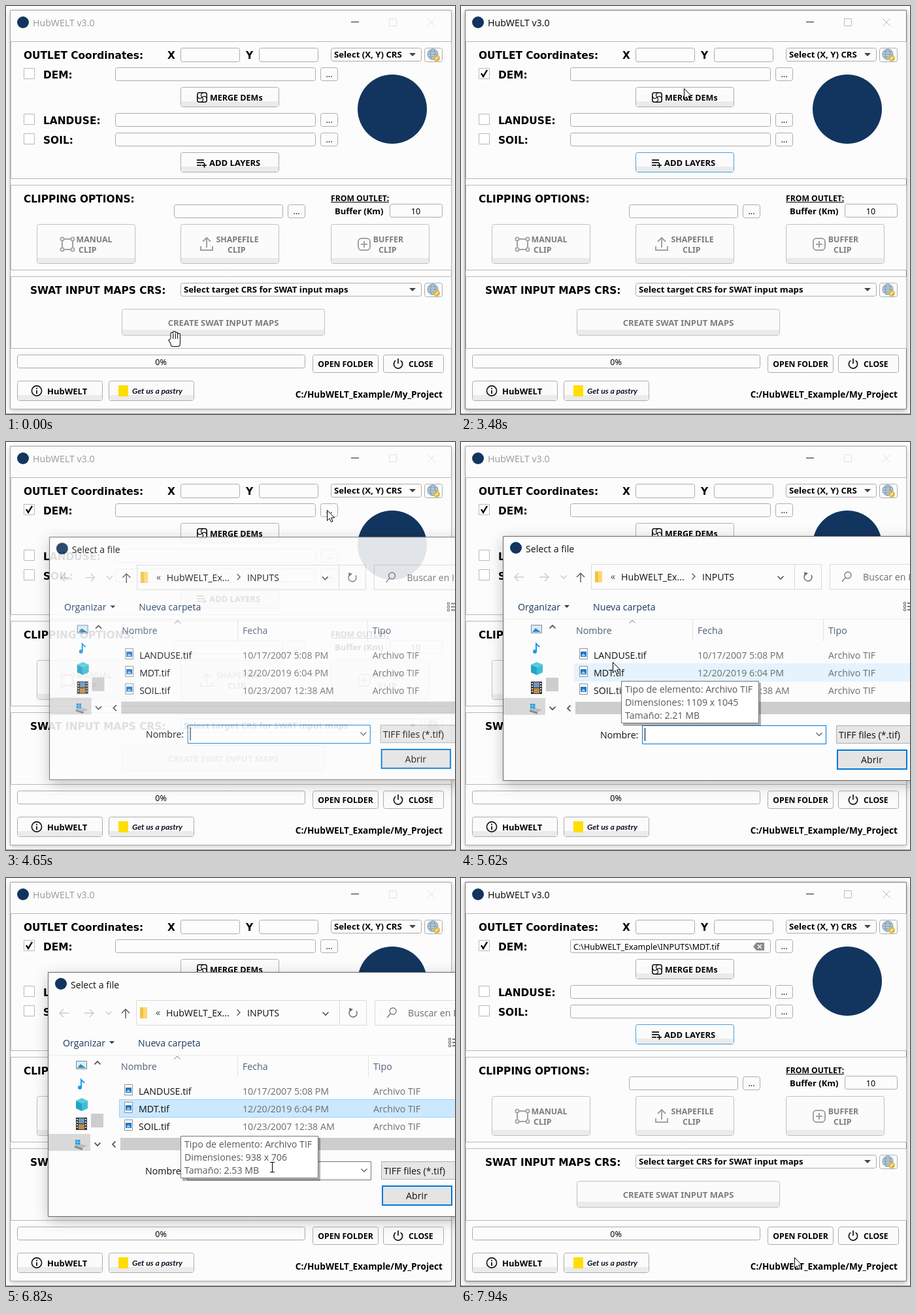
An HTML page with a canvas for the animation above (8 s loop, 687 px wide and 625 px high).

```html
<!DOCTYPE html>
<html lang="en">
<head>
<meta charset="utf-8">
<title>HubWELT v3.0</title>
<style>
html, body { margin: 0; width: 100%; height: 100%; overflow: hidden; background: #fff; }
canvas { display: block; }
</style>
</head>
<body>
<canvas id="stage" width="687" height="625"></canvas>
<script>
const c = document.getElementById('stage').getContext('2d');
const LOOP = 8000, TICK = 125, APP = 'HubWELT';
const HEAD = 'bold {}px "DejaVu Sans", sans-serif';
const BOLD = 'bold {}px "Noto Sans", sans-serif';
const PLAIN = '{}px "Noto Sans", sans-serif';
const UI = '{}px "Open Sans", sans-serif';
const LOGO = '#12355f', INK = '#111', GRAY = '#6d6d6d', NAV = '#1e395b', HEADER = '#4c607a';

// When things happen, in ms
const CHECKED = 2850, BROWSE = 3880, OPEN = 4520, PICK = 5980, ACCEPT = 7410, CLOSE = 7550, DONE = 7680;

// Pointer stops: time, x, y
const STOPS = [
  [0, 258, 510], [1240, 258, 510], [1760, 133, 161], [2030, 45, 116], [2600, 38, 107],
  [CHECKED, 38, 107], [3480, 341, 126], [BROWSE, 491, 104], [4800, 491, 104],
  [5190, 290, 306], [5620, 232, 337], [PICK, 221, 356], [6690, 221, 356],
  [6820, 407, 443], [6990, 549, 495], [ACCEPT, 578, 482], [DONE, 578, 482], [LOOP - 60, 510, 581]
];
const FILES = [
  { name: 'LANDUSE.tif', date: '10/17/2007 5:08 PM', dim: '1109 x 1045', size: '2.21 MB' },
  { name: 'MDT.tif', date: '12/20/2019 6:04 PM', dim: '938 x 706', size: '2.53 MB' },
  { name: 'SOIL.tif', date: '10/23/2007 12:38 AM' }
];

// Rises from 0 to 1 in n equal jumps, the first at time t0
const stairs = (t, t0, n) => Math.min(1, Math.max(0, Math.floor((t - t0) / 130 + 1) / n));
const between = (t, from, to) => t >= from && t < to;

// Straight moves between stops, shown in jumps of about one tick
function pointerAt(t) {
  const i = STOPS.findLastIndex(s => s[0] <= t);
  const [t0, x0, y0] = STOPS[i], [t1, x1, y1] = STOPS[i + 1] || [LOOP, x0, y0];
  const n = Math.max(1, Math.round((t1 - t0) / TICK));
  const k = Math.floor((t - t0) / (t1 - t0) * n) / n;
  return [x0 + (x1 - x0) * k, y0 + (y1 - y0) * k];
}

function text(s, x, y, size, color = '#000', font = BOLD, align = 'left') {
  c.font = font.replace('{}', size);
  c.fillStyle = color;
  c.textAlign = align;
  c.fillText(s, x, y);
}
const ui = (s, x, y, color = INK, align) => text(s, x, y, 14.2, color, UI, align);
const head = (s, x, y) => text(s, x, y, 15.4, '#000', HEAD);
function fill(x, y, w, h, color) {
  c.fillStyle = color;
  c.fillRect(x, y, w, h);
}
function box(x, y, w, h, bg, edge, r = 0, lw = 1) {
  c.beginPath();
  c.roundRect(x + lw / 2, y + lw / 2, w - lw, h - lw, r);
  if (bg) { c.fillStyle = bg; c.fill(); }
  if (edge) { c.strokeStyle = edge; c.lineWidth = lw; c.stroke(); }
}
function trace(p) {
  c.beginPath();
  for (let i = 0; i < p.length; i += 2) c.lineTo(p[i], p[i + 1]);
}
function line(color, lw, ...p) {
  trace(p);
  c.strokeStyle = color;
  c.lineWidth = lw;
  c.stroke();
}
function shape(color, ...p) {
  trace(p);
  c.fillStyle = color;
  c.fill();
}
function disc(x, y, r, color) {
  c.beginPath();
  c.arc(x, y, r, 0, 7);
  c.fillStyle = color;
  c.fill();
}
function ring(x, y, r, color, lw, from = 0, to = 2 * Math.PI) {
  c.beginPath();
  c.arc(x, y, r, from, to);
  c.strokeStyle = color;
  c.lineWidth = lw;
  c.stroke();
}
// Draws at (x, y), turned by a quarter circle q times
function turned(x, y, q, paint) {
  c.save();
  c.translate(x, y);
  c.rotate(q * Math.PI / 2);
  paint();
  c.restore();
}
// Directions: 0 up, 1 right, 2 down, 3 left
const chevron = (x, y, q, color, lw = 1.4) =>
  turned(x, y, q, () => line(color, lw, -4.5, 2.5, 0, -2, 4.5, 2.5));
const arrow = (x, y, q, color) => turned(x, y, q, () => {
  line(color, 1.4, 0, 7, 0, -7);
  line(color, 1.4, -6, -1, 0, -7, 6, -1);
});
function cross(x, y, r, color, lw) {
  line(color, lw, x - r, y - r, x + r, y + r);
  line(color, lw, x + r, y - r, x - r, y + r);
}
function plus(x, y, r, color, lw) {
  line(color, lw, x - r, y, x + r, y);
  line(color, lw, x, y - r, x, y + r);
}
function shadowed(color, blur, dy, paint) {
  c.save();
  c.shadowColor = color;
  c.shadowBlur = blur;
  c.shadowOffsetY = dy;
  paint();
  c.restore();
}

function button(x, y, w, h, edge = '#adadad') {
  box(x, y, w, h, '#fbfbfb', edge, 3);
  if (h > 30) fill(x + 1, y + h - 9, w - 2, 8, '#ebebeb');
}
const field = (x, y, w, h = 21) => box(x, y, w, h, '#fcfcfc', '#ababab', 3);
const value = (s, x, y, align) => text(s, x, y, 12.5, '#000', PLAIN, align);
function dots(x, y) {
  button(x, y, 27, 21);
  value('...', x + 13.5, y + 15, 'center');
}
function combo(x, y, w, label) {
  field(x, y, w);
  c.save();
  c.beginPath();
  c.rect(x, y, w - 25, 21);
  c.clip();
  text(label, x + 5, y + 15, 13.2);
  c.restore();
  shape('#444', x + w - 19, y + 8, x + w - 9, y + 8, x + w - 14, y + 13);
}
function globe(x, y) {
  button(x - 14, y - 11, 28, 22);
  disc(x - 1, y - 1, 8, '#b9cddd');
  ring(x - 1, y - 1, 8, '#7b97ae', 1);
  c.beginPath();
  c.ellipse(x - 1, y - 1, 3.5, 8, 0, 0, 7);
  c.stroke();
  for (const d of [-4, 0, 4]) line('#7b97ae', 1, x - 8, y - 1 + d, x + 6, y - 1 + d);
  disc(x + 5, y + 5, 5, '#dcb945');
  line('#fff', 1.5, x + 3, y + 7, x + 7, y + 3);
}
function check(x, y, on) {
  box(x, y, 17, 17, '#fff', '#b9b9b9');
  if (on) line('#000', 2.4, x + 4, y + 8, x + 7, y + 13, x + 13, y + 3);
}

function icons() {
  const g = '#a2a2a2';
  box(292, 132, 16, 16, null, INK, 3, 1.6);
  for (let q = 0; q < 4; q++) turned(300, 140, q, () => ring(2, -3.5, 3.5, INK, 1.3, 1.9, 4.6));
  for (let i = 0; i < 3; i++) line(INK, 1.8, 292, 236 + 4 * i, i < 2 ? 303 : 299, 236 + 4 * i);
  plus(303.5, 244, 3.5, INK, 1.8);

  box(85, 356, 18, 18, null, g, 0, 2);
  for (const x of [86, 102]) for (const y of [357, 373]) {
    disc(x, y, 3.2, '#fbfbfb');
    ring(x, y, 2.6, g, 1.8);
  }
  line(g, 2, 307, 370, 307, 356);
  line(g, 2, 301, 361, 307, 355, 313, 361);
  line(g, 2, 298, 368, 298, 374, 316, 374, 316, 368);
  box(538, 355, 20, 20, null, g, 5, 2);
  plus(548, 365, 5, g, 2);

  ring(600, 548.5, 6.6, INK, 1.7, -.95, Math.PI + .95);
  line(INK, 1.7, 600, 540, 600, 548);
  ring(47, 589.5, 7.6, INK, 1.6);
  line(INK, 1.8, 47, 588.5, 47, 594);
  disc(47, 585.8, 1.1, INK);
}

function mainWindow(t) {
  const active = between(t, CHECKED, BROWSE) || t >= DONE;
  shadowed(active ? 'rgba(0,0,0,.35)' : 'rgba(0,0,0,.22)', 8, 2, () => fill(6, 6, 676, 612, '#fcfcfc'));
  box(6, 6, 676, 612, '#fcfcfc', active ? '#777' : '#a5a5a5');
  fill(0, 624, 687, 1, '#9a9a9a');

  disc(26, 25, 9, LOGO);
  ui(APP + ' v3.0', 41, 31, active ? '#000' : '#999');
  fill(528, 24, 12, 1, '#222');
  const faint = active ? '#bbb' : '#e2e2e2';
  box(586, 19, 12, 12, null, faint);
  cross(651, 25, 6, faint, 1);

  for (const [y, h] of [[54, 211], [274, 131], [414, 111]]) box(7, y, 675, h, null, '#b8b8b8');

  head('OUTLET Coordinates:', 27, 81);
  ['X', 'Y'].forEach((s, i) => {
    head(s, 247 + 120 * i, 81);
    field(267 + 120 * i, 64, 91, 22);
  });
  combo(497, 64, 139, 'Select (X, Y) CRS');
  globe(654, 75);
  ['DEM:', 'LANDUSE:', 'SOIL:'].forEach((s, i) => {
    const y = i ? 134 + 30 * i : 94;
    check(27, y + 1, !i && t >= CHECKED);
    head(s, 57, y + 17);
    field(167, y, 307);
    dots(481, y);
  });
  if (t >= DONE) {
    value(`C:\\${APP}_Example\\INPUTS\\MDT.tif`, 172, 110);
    shape('#888', 447, 105, 452, 99, 464, 99, 464, 111, 452, 111);
    cross(457, 105, 3, '#fff', 1.5);
  }
  button(267, 124, 151, 31);
  text('MERGE DEMs', 312, 145, 12.5);
  button(267, 224, 151, 31, active ? '#4aa0e0' : undefined);
  text('ADD LAYERS', 311, 245, 13);
  disc(591, 158, 53, LOGO);

  head('CLIPPING OPTIONS:', 27, 301);
  field(257, 304, 167);
  dots(431, 304);
  text('FROM OUTLET:', 497, 299, 12.2);
  fill(497, 300, 89, 1, '#000');
  text('Buffer (Km)', 503, 319, 13);
  field(587, 303, 81);
  value('10', 627, 319, 'center');
  [['MANUAL', 135], ['SHAPEFILE', 354], ['BUFFER', 585]].forEach(([s, x], i) => {
    button([47, 267, 497][i], 334, 151, 61, '#c0c0c0');
    text(s, x, 362, 12.4, '#7d7d7d', BOLD, 'center');
    text('CLIP', x - (i ? 15 : 24), 378, 12.4, '#7d7d7d');
  });

  head('SWAT INPUT MAPS CRS:', 37, 441);
  combo(267, 424, 369, 'Select target CRS for SWAT input maps');
  globe(654, 435);
  button(177, 464, 311, 41, '#c0c0c0');
  text('CREATE SWAT INPUT MAPS', 332.5, 490, 13, '#7d7d7d', BOLD, 'center');

  field(17, 534, 441);
  value('0%', 237, 550, 'center');
  button(469, 534, 101, 28);
  text('OPEN FOLDER', 519.5, 553, 12.2, '#000', BOLD, 'center');
  button(577, 534, 93, 28);
  text('CLOSE', 616, 553, 12.2);
  button(17, 574, 131, 31);
  text(APP, 63, 595, 13);
  button(157, 574, 131, 31);
  fill(172, 581, 15, 17, '#ffdd00');
  text('Get us a pastry', 193, 594, 12.2, '#0d0c22', 'italic bold {}px Lato, sans-serif');
  text(`C:/${APP}_Example/My_Project`, 668, 600, 13.6, '#000', BOLD, 'right');
  icons();
}

function fileIcon(x, y) {
  box(x, y, 13, 17, '#fff', '#8a8f96');
  fill(x + 2, y + 5, 9, 8, '#1f78c8');
  shape('#9bd0f5', x + 3, y + 12, x + 6, y + 8, x + 10, y + 12);
}

function sidebar() {
  box(107, 280, 17, 13, '#d7ecfa', '#7d8a96');
  shape('#3b87b9', 109, 291, 114, 285, 122, 291);
  line('#1e9be8', 2, 115, 321, 115, 309, 120, 314);
  disc(113, 321, 3, '#1e9be8');
  shape('#22a5c4', 107, 341, 116, 345, 116, 357, 107, 353);
  shape('#3fbdd6', 125, 341, 116, 345, 116, 357, 125, 353);
  shape('#58cbe0', 107, 341, 116, 337, 125, 341, 116, 345);
  fill(107, 367, 17, 19, '#333');
  fill(111, 368, 9, 8, '#6f97bd');
  fill(111, 377, 9, 8, '#b98c4d');
  for (let y = 369; y < 385; y += 4) for (const x of [108, 121]) fill(x, y, 2, 2, '#ddd');
  fill(65, 392, 64, 26, '#d9d9d9');
  shape('#b8bcc0', 105, 410, 111, 407, 124, 410, 117, 414);
  shape('#85898d', 105, 410, 117, 414, 117, 417, 105, 413);
  for (const x of [106, 110]) for (const y of [401, 405]) fill(x, y, 3.4, 3.4, '#1e9be8');
  chevron(140, 283, 0, '#444', 1.6);
  chevron(140, 408, 2, '#444', 1.6);
  fill(130, 361, 19, 21, '#cdcdcd');
}

function addressBar() {
  arrow(89, 207, 3, '#c9c9c9');
  arrow(127, 207, 1, '#c9c9c9');
  chevron(157, 207, 2, '#c9c9c9');
  arrow(183, 208, 0, '#555');
  for (const [x, w] of [[199, 312], [510, 42], [564, 160]]) box(x, 187, w, 39, '#fcfcfc', '#d9d9d9');
  fill(205, 198, 11, 17, '#ffd76e');
  fill(205, 198, 5, 17, '#f3c14b');
  ui('«', 229, 211, '#444');
  ui(APP + '_Ex...', 245, 212);
  chevron(356, 206, 1, '#555');
  ui('INPUTS', 369, 212);
  chevron(489, 208, 2, '#555', 1.6);
  ring(531, 207, 6, '#666', 1.4, -.6, 4.3);
  shape('#666', 525, 199, 531, 201, 526, 205);
  ring(592, 204, 5, '#777', 1.3);
  line('#777', 1.3, 588, 208, 583, 214);
  ui('Buscar en INPUTS', 615, 212, GRAY);
}

function fileList(t) {
  const columns = [176, 362, 562];
  ['Nombre', 'Fecha', 'Tipo'].forEach((s, i) => {
    ui(s, columns[i], 294, HEADER);
    if (i) fill(columns[i] - 8, 272, 1, 33, '#e2e2e2');
  });
  chevron(262, 275, 0, '#777', 1);

  if (between(t, 5340, 5620)) fill(173, 312, 530, 27, '#e5f3ff');
  if (t >= 5620) fill(173, 339, 530, 28, t >= ACCEPT ? '#d9d9d9' : t >= PICK ? '#cce8ff' : '#e5f3ff');
  if (between(t, PICK, ACCEPT)) box(173, 339, 530, 28, null, '#99d1ff');
  FILES.forEach((f, i) => {
    const y = 332 + 27 * i;
    fileIcon(181, y - 16);
    ui(f.name, 203, y);
    ui(f.date, 362, y, GRAY);
    ui('Archivo TIF', 562, y, GRAY);
  });
  fill(175, 398, 530, 19, '#cdcdcd');
  chevron(165, 408, 3, '#444', 1.6);
}

function fileWindow(t) {
  shadowed('rgba(0,0,0,.25)', 20, 6, () => fill(65, 144, 660, 375, '#fcfcfc'));
  box(64, 144, 660, 375, '#fcfcfc', '#666');
  disc(84, 162, 9, LOGO);
  ui('Select a file', 99, 169);
  addressBar();
  ui('Organizar', 87, 258, NAV);
  shape(NAV, 158, 250, 166, 250, 162, 254);
  ui('Nueva carpeta', 202, 258, NAV);
  for (const y of [245, 250, 255]) {
    box(677, y, 4, 4, null, '#666');
    fill(683, y + 1, 10, 2, '#777');
  }
  fill(65, 271, 640, 1, '#ececec');
  sidebar();
  fileList(t);

  const named = t >= PICK;
  ui('Nombre:', 213, 454);
  box(277, 434, 282, 29, '#fff', named ? '#777' : '#0078d7');
  if (named) ui('MDT.tif', 282, 454);
  else fill(281, 438, 1, 20, '#000');
  chevron(548, 448, 2, '#555', 1.2);
  box(574, 434, 150, 28, '#e6e6e6', '#adadad');
  ui('TIFF files (*.tif)', 578, 454);
  box(575, 471, 108, 31, t >= 7140 ? '#e5f1fb' : '#e4e4e4', '#0078d7', 0, 2);
  ui('Abrir', 628.5, 492, INK, 'center');
}

function tooltip(file, x, y, alpha) {
  c.save();
  c.globalAlpha = alpha;
  fill(x + 3, y + 3, 211, 66, 'rgba(0,0,0,.3)');
  box(x, y, 211, 65, '#fff', '#767676');
  ['Tipo de elemento: Archivo TIF', 'Dimensiones: ' + file.dim, 'Tamaño: ' + file.size].forEach((s, n) =>
    ui(s, x + 6, y + 18 + 20 * n, '#575757'));
  c.restore();
}

function hand() {
  c.beginPath();
  for (let i = 0; i < 4; i++) c.roundRect(-5.5 + 3.4 * i, -11 + Math.abs(i - 1) * 1.5, 3.2, 16, 1.6);
  c.roundRect(-5.5, -1, 13.3, 12, 3);
  c.moveTo(-4, 10);
  c.lineTo(-8.5, 2);
  c.lineTo(-6, 0);
  c.lineTo(-2, 6);
  c.closePath();
  c.strokeStyle = '#000';
  c.lineWidth = 2;
  c.stroke();
  c.fillStyle = '#fff';
  c.fill();
  for (let i = 0; i < 3; i++) line('#000', 1, -2.2 + 3.4 * i, -8, -2.2 + 3.4 * i, 0);
}
function beam() {
  fill(0, -8, 1, 15, '#000');
  for (const y of [-8, 7]) fill(-3, y, 7, 1, '#000');
}
function arrowhead() {
  const p = [.5, .5, .5, 16.5, 4, 13, 6.5, 18.5, 9, 17.5, 6.6, 12, 11.5, 12];
  shape('#fff', ...p);
  line('#000', 1, ...p, .5, .5);
}

// Fades the file window as a whole by laying the picture below over it
const below = document.createElement('canvas');
below.width = 687;
below.height = 625;
const copy = below.getContext('2d');
function fadedWindow(t, alpha) {
  const scale = 1 - .06 * (1 - alpha);
  copy.drawImage(c.canvas, 0, 0);
  c.save();
  c.translate(374, 331);
  c.scale(scale, scale);
  c.translate(-374, -331);
  fileWindow(t);
  c.restore();
  c.save();
  c.globalAlpha = 1 - alpha;
  c.drawImage(below, 0, 0);
  c.restore();
}

function draw() {
  const t = performance.now() % LOOP;
  fill(0, 0, 687, 625, '#fff');
  mainWindow(t);
  const alpha = 1 - (1 - stairs(t, OPEN, 3)) ** 2 - stairs(t, CLOSE, 2);
  if (alpha === 1) fileWindow(t);
  else if (alpha > 0) fadedWindow(t, alpha);
  tooltip(FILES[0], 245, 366, stairs(t, 5470, 1) - stairs(t, 5870, 2));
  tooltip(FILES[1], 267, 395, stairs(t, 6550, 2) - stairs(t, 6990, 2));

  c.save();
  c.translate(...pointerAt(t).map(Math.round));
  if (t < 1370) hand();
  else if (between(t, 6820, 6990)) beam();
  else arrowhead();
  c.restore();
  requestAnimationFrame(draw);
}
requestAnimationFrame(draw);
</script>
</body>
</html>
```
